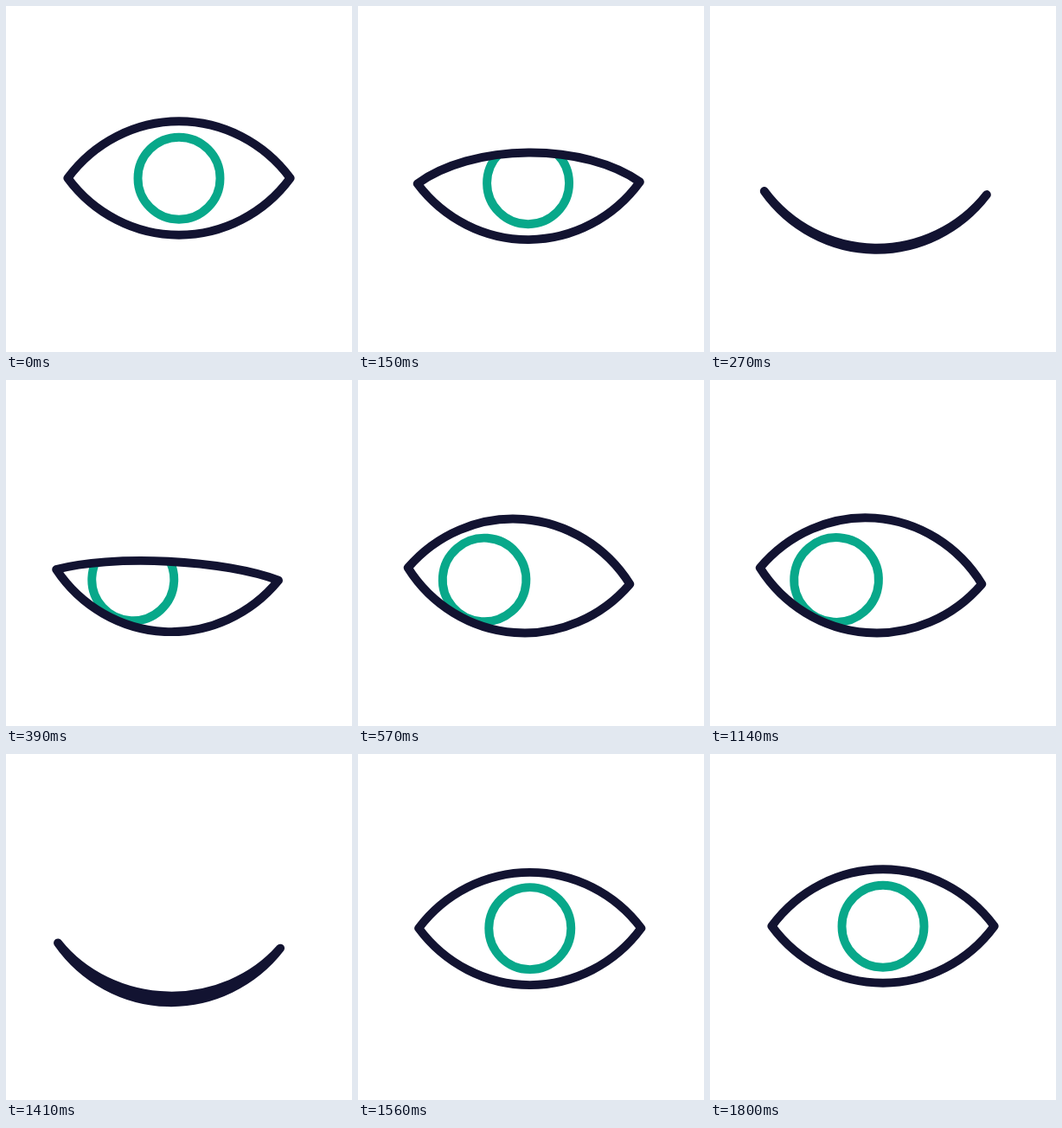
An HTML page that plays this animation: 400x400 px, repeating every 1.89 s.

```html
<!DOCTYPE html>
<html lang="en">
<head>
<meta charset="utf-8">
<title>Looking eye</title>
<style>
  html, body { margin: 0; width: 100%; height: 100%; overflow: hidden; background: #fff; }
  svg { display: block; width: 100%; height: 100%; }
</style>
</head>
<body>
<svg viewBox="0 0 400 400" fill="none">
  <defs><clipPath id="inside"><path id="opening"/></clipPath></defs>
  <g id="eye" stroke-width="9.9" stroke-linejoin="round">
    <g clip-path="url(#inside)"><circle id="iris" stroke="#08a88a"/></g>
    <path id="lids" stroke="#121331"/>
  </g>
</svg>
<script>
const LOOP = 1890, STEP = 30, LAST = 1800;
const HALF = 128.6, RISE = 65.7;

const find = id => document.getElementById(id);
const eye = find("eye"), iris = find("iris"), lids = find("lids"), opening = find("opening");

// Eased 0 to 1 between two times.
function ramp(t, from, to) {
  const p = Math.min(1, Math.max(0, (t - from) / (to - from)));
  return p * p * (3 - 2 * p);
}

// Rises from 0 to 1 at the peak, then falls back.
const bump = (t, from, peak, to) => ramp(t, from, peak) - ramp(t, peak, to);

// Goes out over one span and comes back over another.
const trip = (t, out, there, back, home) => ramp(t, out, there) - ramp(t, back, home);

// Arc from one corner to the other; dir is 1 from left to right.
function lidArc(height, dir) {
  const side = dir * HALF, lift = 0.62 * height;
  return `C${-side + dir * 30} ${lift} ${-dir * 51} ${height} 0 ${height}` +
         `C${dir * 51} ${height} ${side - dir * 30} ${lift} ${side} 0`;
}

function draw(t) {
  const move = trip(t, 35, 440, 1335, 1610);
  const turn = 4.2 * trip(t, 150, 540, 1170, 1560) - 0.45 * bump(t, 0, 150, 300);
  const gaze = trip(t, 130, 390, 1300, 1560);
  const shut = bump(t, 80, 285, 466) + bump(t, 1200, 1380, 1590);
  // The lid lifts a little before each blink and after the last one.
  const lift = bump(t, 0, 80, 285) + bump(t, 1115, 1200, 1380) + bump(t, 1380, 1590, 1800);
  const lid = RISE * (2 * shut - 1) - 6.5 * lift;

  const shape = `M${-HALF} 0${lidArc(lid, 1)}${lidArc(RISE, -1)}Z`;
  lids.setAttribute("d", shape);
  opening.setAttribute("d", shape);
  eye.setAttribute("transform",
    `translate(${200 - 14 * move} ${199 + 27.5 * move}) rotate(${turn})`);
  iris.setAttribute("cx", -39.5 * gaze);
  iris.setAttribute("cy", 0.2 + 7.2 * gaze);
  iris.setAttribute("r", 47.5 + 2.3 * bump(t, 390, 840, 1540));
}

const start = performance.now();
function tick() {
  const t = (performance.now() - start) % LOOP;
  draw(Math.min(LAST, Math.floor(t / STEP) * STEP));
  requestAnimationFrame(tick);
}
tick();
</script>
</body>
</html>
```
